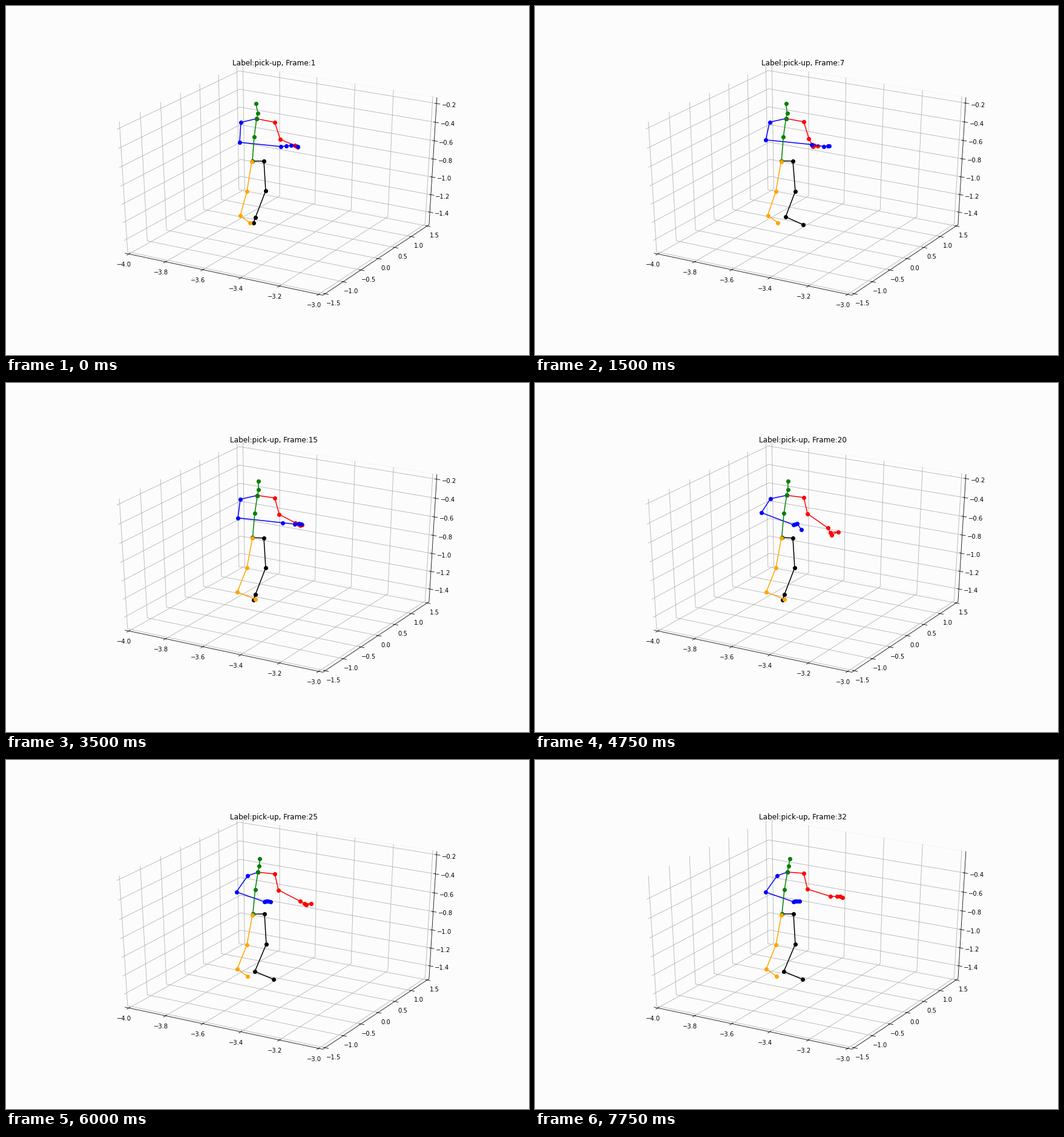
Animation of 864 by 576 pixels, one loop 8000 ms. Source, as a matplotlib script:

```python
import numpy as np
import matplotlib.pyplot as plt
from matplotlib.animation import FuncAnimation

W, H = 864, 576
FRAMES, INTERVAL = 32, 250

plt.rcParams["font.family"] = "DejaVu Sans"
fig = plt.figure(figsize=(W / 72, H / 72), dpi=72, facecolor="#fcfcfc")
ax = fig.add_axes([0, 0, 1, 1])
ax.set_xlim(0, W)
ax.set_ylim(H, 0)
ax.axis("off")

# Perspective camera around a unit cube centred on the origin
AZIM, ELEV = np.radians(-60), np.radians(30)
RIGHT = np.array([-np.sin(AZIM), np.cos(AZIM), 0])
UP = np.array([-np.cos(AZIM) * np.sin(ELEV), -np.sin(AZIM) * np.sin(ELEV), np.cos(ELEV)])
TOWARD = np.cross(RIGHT, UP)
CENTER = np.array([451.85, 280.7])
SCALE = np.array([3619.5, -2350.7])

EDGE = 0.5 + 1 / 48      # cube wall
LABEL = EDGE + 0.5 / 12  # tick label offset
TICK_IN, TICK_OUT = EDGE - 0.1 / 12, EDGE + 0.2 / 12


def project(points):
    p = np.asarray(points, float)
    depth = 10 - p @ TOWARD
    flat = np.stack([p @ RIGHT, p @ UP], axis=-1) / depth[..., None]
    return CENTER + flat * SCALE


def line(points, **style):
    style = {"color": "black", "lw": 0.8, **style}
    return ax.plot(*project(points).T, **style)[0]


def label(point, value):
    x, y = project(point)
    text = f"{value:.1f}".replace("-", "\u2212")
    return ax.text(x, y, text, fontsize=10, ha="center", va="top", zorder=3)


def z_parts(q):
    e = EDGE
    grid = [(-e, -e, q), (-e, e, q), (e, e, q)]
    tick = [(TICK_IN, e, q), (TICK_OUT, e, q)]
    return grid, tick, (LABEL, LABEL, q)


e = EDGE
GRID = {"color": "#b0b0b0", "zorder": 1}

for z in (e, -e):
    line([(-e, e, z), (e, e, z)], color="#e4e4e4", lw=0.6, ls=(0, (4, 4)), zorder=0)

for value in np.linspace(-4, -3, 6):
    q = value + 3.5
    line([(q, e, e), (q, e, -e), (q, -e, -e)], **GRID)
    line([(q, -TICK_IN, -e), (q, -TICK_OUT, -e)])
    label((q, -LABEL, -LABEL), value)

for value in np.linspace(-1.5, 1.5, 7):
    q = value / 3
    line([(-e, q, e), (-e, q, -e), (e, q, -e)], **GRID)
    line([(TICK_IN, q, -e), (TICK_OUT, q, -e)])
    label((LABEL, q, -LABEL), value)

line([(-e, -e, -e), (e, -e, -e), (e, e, -e), (e, e, e)])

Z_MIN = -1.517
Z_TICKS = np.linspace(-1.4, -0.2, 7)
z_rows = []
for value in Z_TICKS:
    grid, tick, spot = z_parts(0)
    z_rows.append((line(grid, **GRID), line(tick), label(spot, value)))

title = ax.text(442.8, 97.9, "", fontsize=12, ha="center", va="baseline", zorder=10)

# Each joint: start, end, then how far each of the limb's swings carries it
SPINE = [
    [(413, 161), (421, 163)],  # head
    [(416, 177), (419, 175)],
    [(414, 186), (417, 185)],  # chest
    [(410, 216), (412, 214)],
    [(407, 256), (408, 254)],  # hips
]
RED_ARM = [  # swings: pull in, lower
    [(444, 192), (444, 187), (0, 0), (0, 0)],
    [(453, 220), (450, 213), (0, 0), (-1, 0)],
    [(478, 230), (488, 225), (-27, 0), (0, 13)],
    [(480, 231), (499, 225), (-28, 0), (-4, 20)],
    [(484, 233), (508, 227), (-36, 0), (2, 17)],
    [(482, 232), (504, 225), (-24, 0), (-6, 24)],
]
BLUE_ARM = [  # swings: pull in, lift, wave
    [(388, 192), (400, 191), (-1, -1), (-11, 0), (0, 0)],
    [(386, 225), (381, 218), (-13, -11), (-7, -4), (0, 0)],
    [(454, 232), (427, 234), (-4, -12), (0, 0), (4, 1)],
    [(463, 231), (430, 233), (0, -6), (0, 0), (14, 3)],
    [(471, 230), (433, 233), (0, -5), (0, -1), (13, 3)],
    [(482, 232), (437, 233), (-7, -5), (3, 9), (7, 1)],
]
BLACK_LEG = [  # swing: kick
    [(426, 256), (427, 254), (0, 0)],
    [(429, 305), (430, 304), (1, 1)],
    [(412, 349), (411, 349), (2, -1)],
    [(409, 358), (442, 362), (34, 3)],
]
ORANGE_LEG = [  # swing: foot out
    [(406, 257), (407, 256), (0, 0)],
    [(398, 306), (398, 305), (0, 0)],
    [(387, 346), (382, 345), (0, 0)],
    [(403, 358), (399, 357), (13, 0)],
]


def ease(i, start, end):
    t = np.clip((i - start) / (end - start), 0, 1)
    return t * t * (3 - 2 * t)


def bump(i, mid, width):
    return np.exp(-((i - mid) / width) ** 2)


def place(joints, progress, *swings):
    weights = np.array([1 - progress, progress, *swings])
    return np.einsum("k,jkc->jc", weights, np.array(joints, float))


def pose(i):
    p = i / (FRAMES - 1)
    spine = place(SPINE, p)
    chest, hips = spine[2], spine[4]
    back = ease(i, 14, 19)
    wave = np.cos(np.pi * (i - 6) / 4) * (1 - back)
    foot_out = ease(i, 6, 10) - ease(i, 20, 24)
    return {
        "red": [chest, *place(RED_ARM, p, bump(i, 8, 4.5), bump(i, 20, 5))],
        "blue": [chest, *place(BLUE_ARM, back, bump(i, 9.5, 3.5), bump(i, 19, 3), wave)],
        "black": [hips, *place(BLACK_LEG, ease(i, 20, 24), bump(i, 6, 2))],
        "green": spine,
        "orange": place(ORANGE_LEG, ease(i, 0, 12), foot_out),
    }


limbs = {color: ax.plot([], [], "o-", color=color, lw=1.5, ms=6, zorder=5)[0]
         for color in pose(0)}


def update(i):
    title.set_text(f"Label:pick-up, Frame:{i + 1}")

    z_max = -0.165 - 0.042 * (i / (FRAMES - 1)) ** 1.4
    for value, (grid, tick, text) in zip(Z_TICKS, z_rows):
        q = (value - Z_MIN) / (z_max - Z_MIN) - 0.5
        grid_pts, tick_pts, spot = z_parts(q)
        grid.set_data(*project(grid_pts).T)
        tick.set_data(*project(tick_pts).T)
        text.set_position(project(spot))
        for artist in (grid, tick, text):
            artist.set_visible(q <= 0.5)

    for color, points in pose(i).items():
        limbs[color].set_data(*np.transpose(points))
    return []


anim = FuncAnimation(fig, update, frames=FRAMES, interval=INTERVAL,
                     init_func=lambda: update(0), repeat=True, repeat_delay=0)
plt.show()
```
